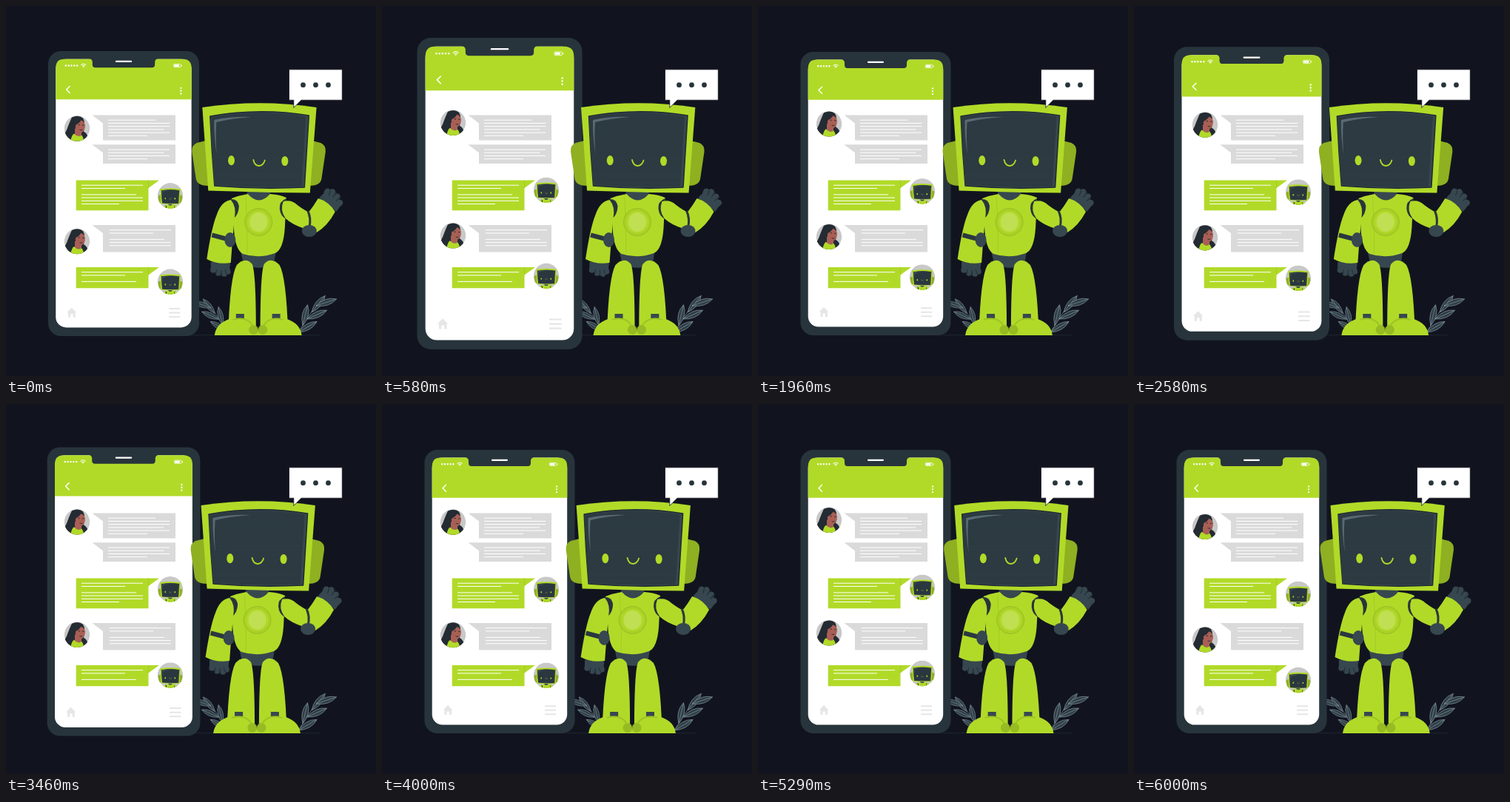
These frames come from a looping animation (500 by 500 pixels, 6.04 s). An HTML page:

```html
<!DOCTYPE html>
<html lang="en">
<head>
<meta charset="utf-8">
<style>
html, body { margin: 0; width: 100%; height: 100%; overflow: hidden; background: #11141f; }
svg { display: block; width: 100vw; height: 100vh; }
.g { fill: #b1da28; } .e { fill: #8fb021; } .w { fill: #fff; }
.d { fill: #28343b; } .j { fill: #37474f; } .hair { fill: #242b33; } .skin { fill: #a95f55; }
.l { fill: none; stroke: #fff; }
.r { stroke-linecap: round; stroke-linejoin: round; }
</style>
</head>
<body>
<svg viewBox="0 0 500 500">
<defs>
  <clipPath id="disc"><circle r="17.3"/></clipPath>
  <pattern id="scan" width="4" height="2" patternUnits="userSpaceOnUse">
    <path d="M0 0H4V2H0Z" fill="#28343b"/><path d="M0 .5H4" stroke="#34434b" stroke-width=".8"/>
  </pattern>

  <g id="woman" clip-path="url(#disc)">
    <circle r="17.3" fill="#c8c8c8"/>
    <path class="hair" d="M-7 -15Q2 -19 8 -14Q12 -8 9 4Q16 8 15 18H-18Q-18 8 -14 2Q-10 -9 -7 -15Z"/>
    <path class="skin" d="M-3 0V9Q2 13 6 9V0Z"/>
    <ellipse class="skin" cx="4" cy="-3" rx="6.500" ry="8.500" transform="rotate(8)"/>
    <path class="hair" d="M-5 -4Q4 -6 6 -13L0 -15L-7 -10Z"/>
    <path class="g" d="M-9 18Q-7 8 -4 7Q1 13 6 9Q9 12 9 18Z"/>
    <path class="r" fill="none" stroke="#242b33" d="M2 -5h1.500M7.500 -4.500h1.500M4 2Q6 3 7 2"/>
  </g>

  <g id="mini" clip-path="url(#disc)">
    <circle r="17.3" fill="#c8c8c8"/>
    <use href="#bot" transform="translate(0 .7) scale(.18) translate(-342 -192)"/>
  </g>

  <!-- wrist at the origin, fingers down -->
  <g id="hand">
    <path class="j" d="M-13 0Q-14 8 -10 13H9Q14 8 13 0Z"/>
    <path class="r" stroke="#37474f" stroke-width="7.500" d="M-9 6L-10 11M-3 6V15M4 6L5 16M8 6L10 13"/>
    <path stroke="#222e36" d="M-6 17L-5 10M1 19V11M8 16L6 10"/>
  </g>

  <path id="ear" class="e" d="M270 182L258 185Q251 188 251.500 197L257 234Q259 243 274 243Z"/>
  <g id="leg">
    <path class="g" d="M300.500 440Q303 366 312 350Q324 338 333 349Q338 362 338 440Z"/>
    <path class="j" d="M311 416h11v10h-11z"/>
    <path class="g" d="M282 445Q284 429 302 423Q322 419 334 428Q342 434 341.500 445Z"/>
    <path fill="none" stroke="#9dc325" stroke-width="2" d="M307 424Q325 419 333 431"/>
    <circle class="e" cx="334.800" cy="437.500" r="6.500" opacity=".75"/>
  </g>
  <path id="glass" d="M276 149Q343 137 409.500 148L403.500 245Q342 248 282 243Q278 196 276 149Z"/>

  <g id="bot">
    <use href="#ear"/><use href="#ear" transform="matrix(-1 0 0 1 683.5 0)"/>
    <path class="j" d="M326 249H357V259Q342 267 326 259Z"/>
    <path class="j" d="M317 330Q342 337 365 331L362 350Q342 358 321 349Z"/>
    <use href="#leg"/><use href="#leg" transform="matrix(-1 0 0 1 681.8 0)"/>
    <!-- torso -->
    <path class="g" d="M305 260Q315 256 327 254Q342 271 357 254Q371 255 379 259L377 300Q375 329 364 334Q342 342 320 335Q309 328 308 298Z"/>
    <path fill="none" stroke="#9dc325" stroke-width=".7" d="M324 258Q327 300 326 334"/>
    <circle cx="341.500" cy="292" r="18.500" fill="#a9d027" stroke="#98bd24"/>
    <circle class="g" cx="341.500" cy="292" r="15"/>
    <ellipse cx="341.500" cy="292" rx="12" ry="13" fill="#c0df52"/>
    <!-- resting arm -->
    <use href="#hand" transform="translate(290 346)"/>
    <path class="d" d="M303 261Q313 260 315 270Q315 281 308 287Z"/>
    <path class="g" d="M304 262Q291 264 285 282Q278 299 271.500 342Q286 350 304 347L306 320Q307 308 309 287Q312 271 304 262Z"/>
    <path stroke="#2b383f" stroke-width="6" d="M278.500 309.500L301 315.500"/>
    <ellipse class="j" cx="303" cy="316" rx="7.500" ry="10"/>
    <!-- waving arm -->
    <use href="#hand" transform="translate(435 269) rotate(217) scale(1.12)"/>
    <path class="d" d="M379 260Q369 264 370 274Q371 284 379 288Z"/>
    <path class="g" d="M375 264Q386 261 394 269Q402 275 408 278L411 299L404 301Q386 295 378 287Q370 276 375 264Z"/>
    <path class="g" d="M422 260Q436 264 445 278Q435 297 420 306L409 299L409 279Q416 270 422 260Z"/>
    <path fill="none" stroke="#2b383f" stroke-width="3" d="M408 277Q413 286 410 300"/>
    <ellipse class="j" cx="410" cy="304" rx="10" ry="8"/>
    <!-- monitor -->
    <path class="g" d="M265.500 137Q343 125.500 419.800 137L411 252.500Q342 252 273.500 249.500Z"/>
    <use href="#glass" class="r" fill="#37474f" stroke="#202a32" stroke-width="1.500"/>
    <use href="#glass" fill="url(#scan)" transform="translate(277 196) scale(.97) translate(-277 -196)"/>
    <path fill="#596a73" d="M285 201Q281 177 281.500 154Q305 149 332 150Q304 152 284.500 157Q283 178 285 201Z"/>
    <ellipse class="g" cx="304.700" cy="208.700" rx="4.500" ry="6.600"/>
    <ellipse class="g" cx="377" cy="209.500" rx="4.500" ry="6.600"/>
    <path class="r" fill="none" stroke="#b1da28" stroke-width="1.800" d="M334.500 208Q336 215.500 342 216Q348 215.500 350 208.500"/>
  </g>
</defs>

<path d="M250 444.600H424" stroke="#232d36" stroke-width=".7"/>
<g id="plants" fill="#2f3e46" stroke="#7d8f98" stroke-width=".7"></g>

<g id="phone">
  <rect class="d" x="57.500" y="62" width="203" height="383" rx="17"/>
  <rect class="w" x="67.700" y="72.600" width="182.500" height="361" rx="14"/>
  <path class="g" d="M67.700 126.800V84Q68 72.600 79 72.600H239Q250 73 250.200 84V126.800Z"/>
  <path class="d" d="M113 72Q117 73 117 77V80Q117 84 121 84H197Q201 84 201 80V77Q201 73 205 72Z"/>
  <path class="l r" stroke-width="2.200" d="M149 75.800H169"/>
  <path class="l r" stroke-width="2.400" stroke-dasharray="0 3.8" d="M81.200 81.300H97"/>
  <path class="l" d="M101.500 80.500Q105 77.500 108.500 80.500M103 82Q105 80.300 107 82"/>
  <circle class="w" cx="105" cy="83" r=".8"/>
  <rect class="l" x="226.300" y="79.300" width="9.500" height="4.200" rx="1" stroke-width=".7"/>
  <path class="w" d="M227 80h6.500v2.800H227zM236.500 80.500h1v1.800h-1z"/>
  <path class="l r" stroke-width="1.400" d="M86.500 109.300L82 113.700L86.500 118.200"/>
  <path class="l r" stroke-width="2.300" stroke-dasharray="0 3.8" d="M236 111.500V119.500"/>
  <path fill="#e6e6e6" d="M89 407L95.500 413.500H94V420H91V415.500H87.500V420H84.500V413.500H82.500Z"/>
  <path stroke="#e6e6e6" stroke-width="1.900" d="M220 408.200h15m-15 5.500h15m-15 5.500h15"/>
</g>

<g id="chat"></g>
<g id="faces">
  <use href="#woman" x="96" y="165.800"/><use href="#mini" x="222" y="256.800"/>
  <use href="#woman" x="96" y="318.300"/><use href="#mini" x="222" y="373"/>
</g>
<g id="robot"><use href="#bot"/></g>

<path class="w" stroke="#11141f" stroke-width=".8" d="M382.500 85.800H454.300V127.200H399L388.800 137.500V127.200H382.500Z"/>
<path class="r" stroke="#28343b" stroke-width="6.800" stroke-dasharray="0 17" d="M401.500 106.700H436"/>
</svg>
<script>
const $ = id => document.getElementById(id);

// Leaves alternate along a stem, closing towards its heading near the top
function plant(x, y, scale, mirror) {
  let parts = '<path d="M-2 3L24 -37"/>';
  for (let k = 0; k < 5; k++) {
    const side = k % 2 ? -1 : 1;
    const angle = -60 + 8 * k + side * (30 - 5 * k);
    parts += `<path transform="translate(${6 * k} ${-9 * k}) rotate(${angle})" d="M0 0Q16 -8 29 0Q16 8 0 0H29"/>`;
  }
  return `<g transform="translate(${x} ${y}) scale(${mirror * scale} ${scale})">${parts}</g>`;
}
$('plants').innerHTML = plant(395, 441, 1, 1) + plant(298, 439, .87, -1);

// Line lengths; 0 leaves a paragraph gap
const BLOCK = [64, 83, 83, 75, 83, 53];
const PARAGRAPHS = [83, 59, 0, 74, 83, 83, 51];

function message(mine, y, x, lengths) {
  const step = 4.22, bottom = y + lengths.length * step + (lengths.includes(0) ? 11.3 : 8.8);
  const shape = mine ? `M94.7 ${y}H207L192.500 ${y + 10.5}V${bottom}H94.7Z` : `M116.500 ${y}H229V${bottom}H131V${y + 11}Z`;
  const text = lengths.map((n, i) => n ? `M${x} ${y + 6.7 + i * step}h${n}` : '').join('');
  return `<path fill="${mine ? '#b1da28' : '#dadada'}" d="${shape}"/><path class="l" d="${text}"/>` +
    (mine ? `<path stroke="#9dc325" stroke-width=".6" d="M192.500 ${y}v10.5"/>` : '');
}
$('chat').innerHTML =
  message(false, 147.5, 138, BLOCK) +
  message(false, 187.3, 138, BLOCK.slice(2)) +
  message(true, 235.5, 102, PARAGRAPHS) +
  message(false, 296, 140, PARAGRAPHS.slice(0, 6)) +
  message(true, 353, 102, PARAGRAPHS.slice(0, 4));

// Linear interpolation through evenly spaced keys, repeating every period
function keyed(keys, time, period) {
  const k = time % period / period * (keys.length - 1), i = Math.floor(k);
  return keys[i] + (keys[i + 1] - keys[i]) * (k - i);
}
const SHAKE = [0, -1, 2, -4, 4, -4, 4, -4, 2, -1, 0];
const BEAT = [1, 1.1, 1.05, 1, 1, 1.1, 1, 1, 1, 1, 1];
const FLOAT = [0, -10, 0];

function draw(now) {
  const t = Math.min(now % 6040 + 28, 6000);
  $('robot').setAttribute('transform', `translate(${keyed(SHAKE, t, 1500)} 0)`);
  $('faces').setAttribute('transform', `translate(0 ${keyed(FLOAT, t, 1500)})`);
  $('phone').setAttribute('transform', `translate(159 253.500) scale(${keyed(BEAT, t, 6000)}) translate(-159 -253.500)`);
}
const start = performance.now();
function loop() {
  draw(performance.now() - start);
  requestAnimationFrame(loop);
}
loop();
</script>
</body>
</html>
```
